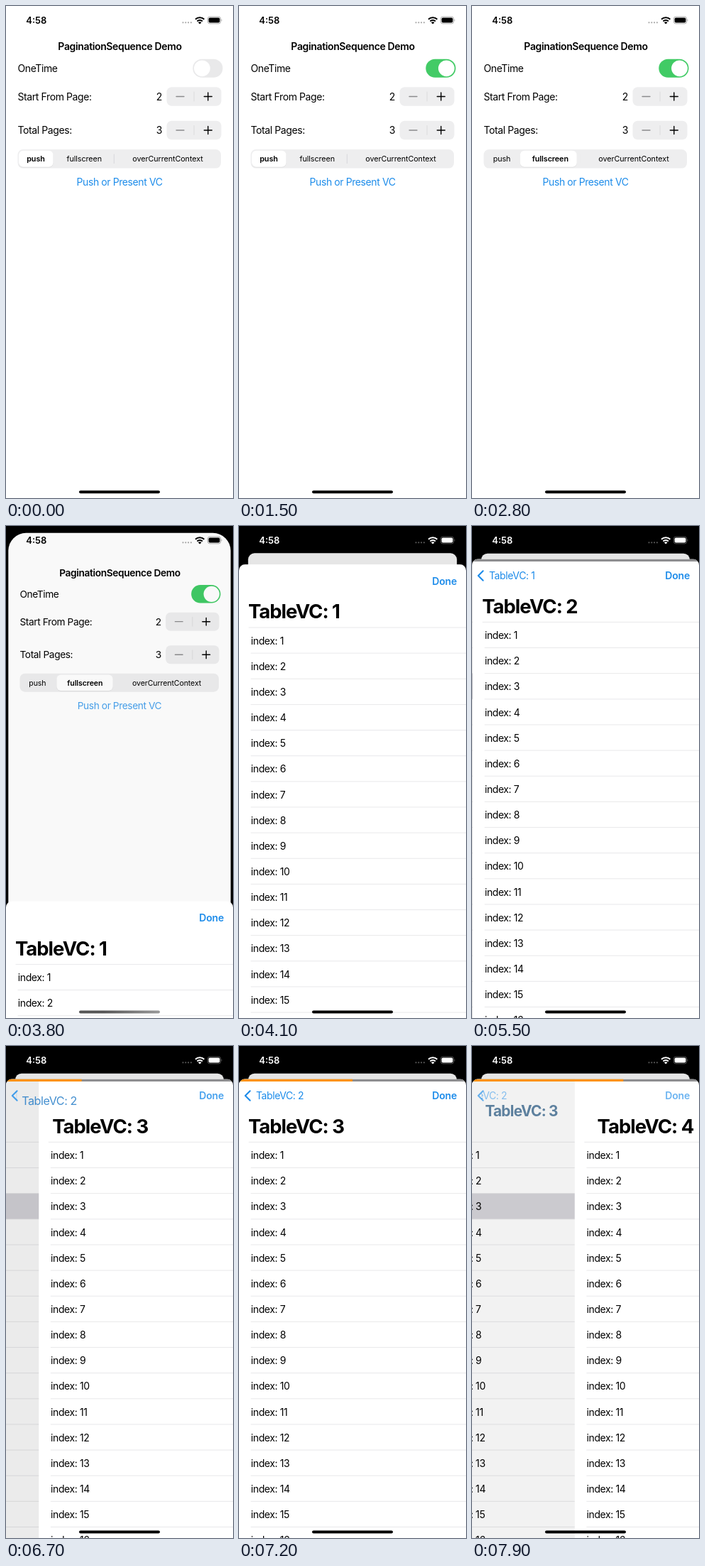
Animation of 320x693 px, one loop 8000 ms. Source, as an HTML page:

```html
<!DOCTYPE html>
<html lang="en">
<head>
<meta charset="utf-8">
<title>Page progress demo</title>
<style>
  html, body { margin: 0; width: 100%; height: 100%; overflow: hidden; background: #000; }
  svg { display: block; width: 100%; height: 100%; }
  text { font: 400 14px Inter, Roboto, sans-serif; letter-spacing: -.029em; font-optical-sizing: none; white-space: pre; }
</style>
</head>
<body>
<svg id="stage" viewBox="0 0 320 693" preserveAspectRatio="none"></svg>
<script>
const NS = 'http://www.w3.org/2000/svg';
const LOOP = 8000, STEP = 100;
const BLUE = [29, 140, 234], BLUE_CSS = `rgb(${BLUE})`;
const SHEET_TOP = 46.5, ROW_TOP = 135.4, ROW_H = 36.14;
const SHEET_START = 3746.7;
const PUSH_START = [0, 5070, 6512.7, 7799.5];   // when each page starts sliding in
const SELECT_AT = [5000, 6400, 7700, Infinity];
const BARS_AT = [[4500, 4700], [5900, 6000], [7300, 7400], [Infinity, Infinity]];

const stage = document.getElementById('stage');

function add(parent, tag, attrs = {}, content) {
  const node = document.createElementNS(NS, tag);
  set(node, attrs);
  if (content !== undefined) node.textContent = content;
  parent.appendChild(node);
  return node;
}
function set(node, attrs) {
  for (const key in attrs) node.setAttribute(key, attrs[key]);
}
const rect = (p, x, y, width, height, fill, rx = 0) => add(p, 'rect', { x, y, width, height, fill, rx });
const line = (p, d, stroke, width = 1) =>
  add(p, 'path', { d, stroke, 'stroke-width': width, fill: 'none', 'stroke-linecap': 'round', 'stroke-linejoin': 'round' });
const label = (p, x, y, str, style = '', anchor = 'start') =>
  add(p, 'text', { x, y, style, 'text-anchor': anchor }, str);

const clamp = v => Math.max(0, Math.min(1, v));
const mix = (a, b, k) => a + (b - a) * k;
const smooth = v => { const k = clamp(v); return k * k * (3 - 2 * k); };
// critically damped spring, 0 to 1
function spring(ms, rate = 18.26) {
  if (ms <= 0) return 0;
  const x = rate * ms / 1000;
  return 1 - (1 + x) * Math.exp(-x);
}

function clip(id, x, y, width, height, rx = 0) {
  const path = add(defs, 'clipPath', { id });
  add(path, 'rect', { x, y, width, height, rx });
}
const defs = add(stage, 'defs');
clip('sheetClip', 0, SHEET_TOP, 320, 720, 8.5);
clip('titleClip', 13, 50, 320, 90);
const fadeInk = add(defs, 'linearGradient', { id: 'fadeInk' });
add(fadeInk, 'stop', { offset: 0.3, 'stop-color': '#555' });
add(fadeInk, 'stop', { offset: 1, 'stop-color': '#999' });

rect(stage, 0, 0, 320, 693, '#000');

// settings screen
const main = add(stage, 'g');
const mainBack = rect(main, 0, 0, 320, 693, '#fff');
label(main, 160.5, 62, 'PaginationSequence Demo', 'font-weight:600;letter-spacing:-.026em', 'middle');

label(main, 16.5, 93, 'OneTime');
const track = rect(main, 263.3, 74.8, 42.2, 26, '#e9e9ea', 13);
const knob = add(main, 'circle', { cy: 87.8, r: 11.4, fill: '#fff' });

function stepper(y, name, value) {
  label(main, 16.5, y + 5, name);
  label(main, 220, y + 5, value, '', 'end');
  rect(main, 226.5, y - 13.3, 77, 26.6, '#eeeeef', 7);
  line(main, `M240 ${y}h11`, '#8b8b8d', 1.3);
  line(main, `M265 ${y - 6.5}v13`, '#d9d9db', 0.9);
  line(main, `M279.3 ${y}h11M284.8 ${y - 5.5}v11`, '#000', 1.4);
}
stepper(127.5, 'Start From Page:', '2');
stepper(175, 'Total Pages:', '3');

rect(main, 16.5, 202, 286.5, 26.6, '#eeeeef', 7.5);
const divider = line(main, 'M152.3 209v12.5', '#d5d5d8', 0.9);
const pillShade = rect(main, 18, 204.4, 48.5, 23.2, '#00000016', 6);
const pill = rect(main, 18, 203.8, 48.5, 23, '#fff', 6);
const segment = (x, str) => label(main, x, 219.3, str, 'font-size:10.8px;letter-spacing:-.008em', 'middle');
const segPush = segment(42, 'push');
const segFull = segment(110.3, 'fullscreen');
segment(228, 'overCurrentContext');
const link = add(main, 'text', { x: 160, y: 253.2, 'text-anchor': 'middle', fill: BLUE_CSS }, 'Push or Present VC');
const mainDim = rect(main, 0, 0, 320, 693, '#000');

// sheet with stacked pages
const sheet = add(stage, 'g');
const sheetBody = add(sheet, 'g', { 'clip-path': 'url(#sheetClip)' });

function makePage(index) {
  const g = add(sheetBody, 'g');
  rect(g, 0, SHEET_TOP, 320, 700, '#fff');
  const chosen = rect(g, 0, ROW_TOP + 2 * ROW_H, 320, ROW_H, '#d6d5da');
  for (let row = 0; row < 16; row++) {
    const y = ROW_TOP + row * ROW_H;
    line(g, `M${row ? 17 : 14} ${y}H321`, '#e3e3e5', 0.8);
    label(g, 16.8, y + 23.7, `index: ${row + 1}`);
  }
  const bar = rect(g, 315.2, 95, 2.5, 432, '#000', 1.2);
  const dim = rect(g, 0, SHEET_TOP, 320, 700, '#000');
  return { g, chosen, bar, dim, index };
}
const pages = [0, 1, 2, 3].map(makePage);

const titleLayer = add(sheetBody, 'g', { 'clip-path': 'url(#titleClip)' });
const titles = pages.map(p => label(titleLayer, 13, 122.6, `TableVC: ${p.index + 1}`));
const chevron = line(sheetBody, 'M15.6 63.3L8.8 70L15.6 76.7', BLUE_CSS, 2.1);
const done = add(sheetBody, 'text',
  { x: 307, y: 75, 'text-anchor': 'end', fill: BLUE_CSS, style: 'font-weight:600;letter-spacing:-.012em' }, 'Done');
const progress = add(sheetBody, 'g');
rect(progress, 0, SHEET_TOP, 320, 3.5, '#8e8e90');
const progressFill = rect(progress, 0, SHEET_TOP, 0, 3.5, '#fc9210');

// status bar and home indicator
const status = add(stage, 'g');
label(status, 28.3, 25, '4:58', 'font-size:13px;font-weight:600;letter-spacing:0');
for (let i = 0; i < 4; i++) add(status, 'circle', { cx: 249.5 + i * 3.8, cy: 23.3, r: 1.1, opacity: 0.35 });
const arc = (r, y) => {
  const dx = r * 0.72;
  const node = line(status, `M${273.2 - dx} ${y}A${r} ${r} 0 0 1 ${273.2 + dx} ${y}`, 'currentColor', 2);
  set(node, { 'stroke-linecap': 'butt' });
};
arc(8.6, 18.8);
arc(5.2, 21.5);
add(status, 'path', { d: 'M270.9 23.2Q273.2 21.5 275.5 23.2L273.2 25.6Z' });
add(status, 'rect', { x: 284.3, y: 15.1, width: 18.4, height: 9.8, rx: 3, fill: 'none', stroke: 'currentColor', 'stroke-width': 0.8, opacity: 0.4 });
add(status, 'rect', { x: 285.6, y: 16.4, width: 15.8, height: 7.2, rx: 1.8 });
add(status, 'path', { d: 'M303.7 18.3q1.5 1.6 0 3.4z', opacity: 0.45 });
const home = rect(stage, 103, 682.4, 114, 4, '#000', 2);

function drawSettings(t, shown) {
  const on = spring(t - 960, 12.5);
  set(knob, { cx: mix(276.4, 292.5, on) });
  set(track, { fill: `rgb(${mix(233, 65, on)},${mix(233, 203, on)},${mix(234, 101, on)})` });

  const seg = spring(t - 2450, 15);
  const box = { x: mix(18, 69.5, seg), width: mix(48.5, 81, seg) };
  set(pill, box);
  set(pillShade, box);
  set(divider, { opacity: 1 - seg });
  segPush.style.fontWeight = seg < 0.5 ? 600 : 400;
  segFull.style.fontWeight = seg < 0.5 ? 400 : 600;
  set(link, { opacity: shown ? mix(0.75, 1, shown) : 1 });

  const scale = 1 - 0.08125 * shown;
  const rx = shown ? mix(31, 9.5, shown) : 0;
  set(main, { transform: `translate(${160 * (1 - scale)} ${38.8 * shown}) scale(${scale})` });
  set(mainBack, { rx });
  set(mainDim, { rx, opacity: 0.1 * shown });
}

function drawTitle(node, enter, leave, gone) {
  // enter, leave and gone run from 1 to 0 for this page and the two after it
  const shade = BLUE.map(c => Math.round(c * (1 - leave)));
  const bold = leave > 0.3;
  set(node, {
    x: mix(24, 13, leave) + 320 * enter - 86 * (1 - gone),
    y: mix(75, 122.6, leave),
    fill: `rgb(${shade})`,
    opacity: gone * (1 - 1.4 * leave * (1 - leave))
  });
  node.style.fontSize = mix(14, 27.5, leave) + 'px';
  node.style.fontWeight = bold ? 700 : 400;
  node.style.letterSpacing = bold ? '-.037em' : '-.029em';
}

function drawSheet(t, shown) {
  set(sheet, { transform: `translate(0 ${(693 - SHEET_TOP) * (1 - shown)})` });

  const arrived = PUSH_START.map((start, i) => i ? spring(t - start) : 1);
  // titles travel a little farther than their pages
  const travel = i => 1.13 * (1 - arrived[i]);
  const rest = i => i < 1 ? 0 : i > 3 ? 1 : Math.min(1, travel(i));

  pages.forEach(({ g, chosen, bar, dim }, i) => {
    const covered = i < 3 ? arrived[i + 1] : 0;
    set(g, { transform: `translate(${320 * (1 - arrived[i]) - 96 * covered} 0)` });
    set(chosen, { opacity: t >= SELECT_AT[i] ? 1 : 0 });
    set(bar, { opacity: t >= BARS_AT[i][1] ? 0.35 : t >= BARS_AT[i][0] ? 0.2 : 0 });
    set(dim, { opacity: 0.093 * covered });
    drawTitle(titles[i], travel(i), rest(i + 1), rest(i + 2));
  });

  let fade = 1;
  for (let i = 1; i < 4; i++) fade -= 1.4 * rest(i) * (1 - rest(i));
  set(done, { opacity: fade });
  set(chevron, { opacity: Math.min(1 - rest(1), fade) });

  const thirds = smooth((t - 5780) / 200) + smooth((t - 7100) / 200);
  set(progress, { opacity: t > PUSH_START[1] ? 1 : 0 });
  set(progressFill, { width: thirds * 320 / 3 });
}

function draw(now) {
  const t = Math.floor(now % LOOP / STEP) * STEP;
  const shown = spring(t - SHEET_START);
  drawSettings(t, shown);
  drawSheet(t, shown);
  const ink = shown > 0.5 ? '#fff' : '#000';
  set(status, { fill: ink, color: ink });
  set(home, { fill: shown > 0 && shown < 0.5 ? 'url(#fadeInk)' : '#000' });
}

const begin = performance.now();
function tick() {
  draw(performance.now() - begin);
  requestAnimationFrame(tick);
}
tick();
</script>
</body>
</html>
```
